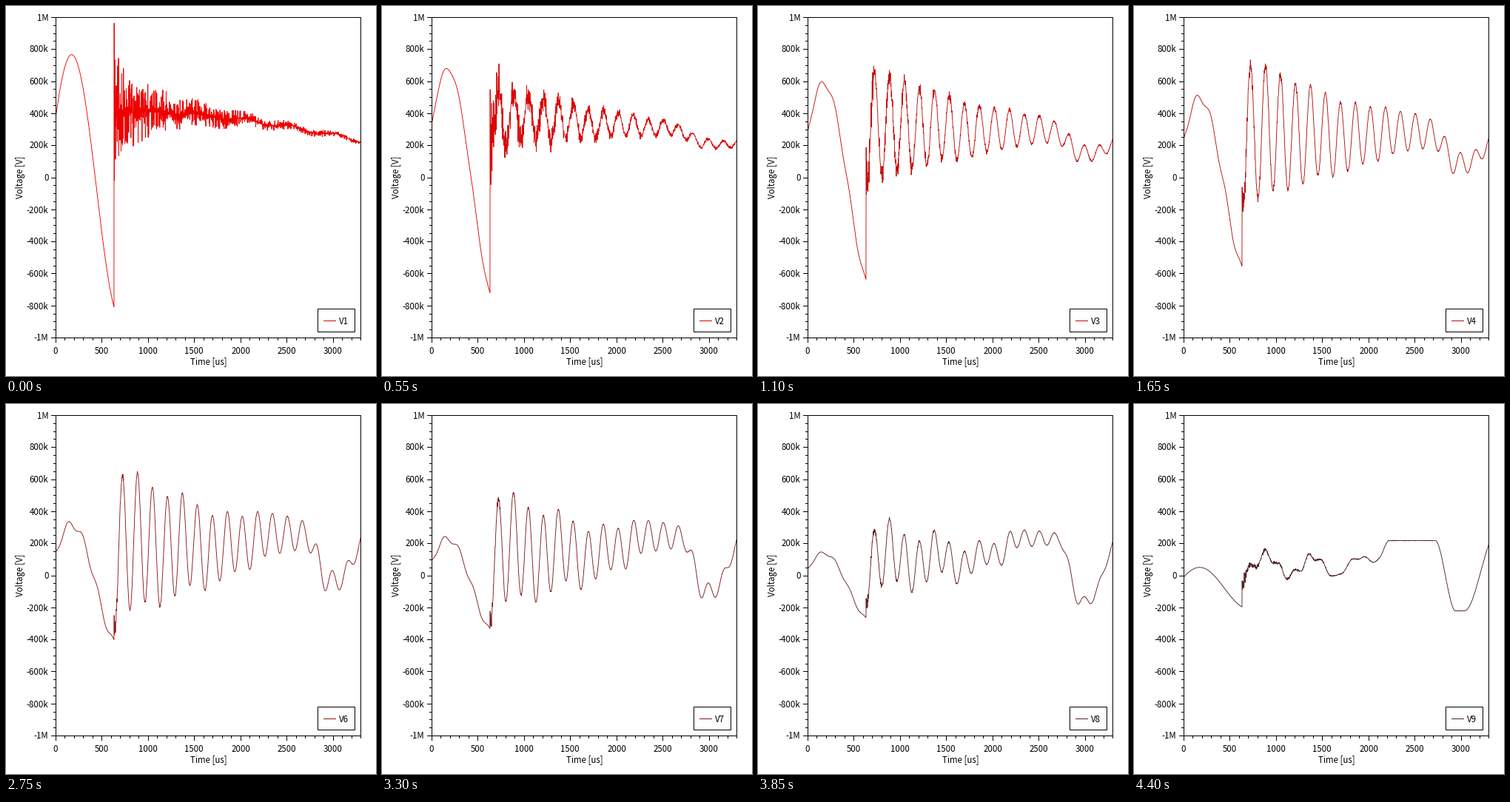
A matplotlib script that plays this animation: 500x500 px, repeating every 4.95 s.

```python
import numpy as np
import matplotlib.pyplot as plt
from matplotlib.animation import FuncAnimation
from matplotlib.patches import Rectangle

PX = 0.72  # points per pixel at 100 dpi
LEFT, RIGHT, TOP, BOTTOM = 67.5, 479.5, 15.5, 448.5
JUMP = 628      # us, when the surge starts
PERIOD = 162.2  # us, ringing of the line
plt.rcParams["font.family"] = ["Noto Sans CJK JP", "DejaVu Sans"]
plt.rcParams["path.snap"] = False

T1 = np.linspace(0, JUMP, 160)
T2 = np.arange(JUMP + 4, 3301, 3.0)
T = np.r_[T1, JUMP + 2, T2]

# Voltage at the far end after the surge: us, kV
FAR_END = [
    (628, -85), (715, 72), (785, 52), (880, 163), (960, 80), (1025, 78),
    (1115, -22), (1200, 38), (1265, 28), (1355, 136), (1420, 97), (1480, 101),
    (1590, -2), (1710, 14), (1830, 105), (1890, 103), (1955, 119), (2050, 83),
    (2115, 110), (2220, 219), (2720, 219), (2940, -220), (3040, -219),
    (3300, 196)]


def to_x(t):
    return LEFT + t * (RIGHT - LEFT) / 3300


def to_y(v):
    return (TOP + BOTTOM) / 2 - v * (BOTTOM - TOP) / 2000


def mix(a, b, u):
    return a + (b - a) * u


def smooth(t, knots):
    """Monotone cubic curve through the knots, flat at every extremum."""
    xs, ys = np.array(knots, float).T
    h = np.diff(xs)
    d = np.diff(ys) / h
    same = d[:-1] * d[1:] > 0
    total = np.where(same, d[:-1] + d[1:], 1)
    m = np.r_[d[0], np.where(same, 2 * d[:-1] * d[1:] / total, 0), d[-1]]
    i = np.clip(np.searchsorted(xs, t, side="right") - 1, 0, len(h) - 1)
    s = (t - xs[i]) / h[i]
    return (ys[i] * (1 + 2 * s) * (1 - s) ** 2 + ys[i + 1] * s * s * (3 - 2 * s)
            + h[i] * (m[i] * s * (1 - s) ** 2 - m[i + 1] * s * s * (1 - s)))


def ringing(t, crest):
    return np.cos(2 * np.pi * (t - crest) / PERIOD)


def voltage(n):
    """Trace at point n of 1..9: both ends mixed, plus a standing wave."""
    u = (n - 1) / 8
    wave = np.sin(np.pi * u)
    fall = np.exp(-0.45 * (n - 1) ** 1.3)

    pre = (mix(828, 130, u) * np.cos(0.005875 * (T1 - 170)) + mix(-60, -78, u)
           + 28 * wave * ringing(T1, 130))

    near = (420 - 190 * ((T2 - JUMP) / 2672) ** 1.8
            + 12 * np.cos(2 * np.pi * (T2 - 2050) / 490))
    ms = (T2 - 721) / 1000
    decay = np.exp(-ms * (0.5 + 0.14 * ms))
    post = (mix(near, smooth(T2, FAR_END), u)
            + 455 * wave * decay * ringing(T2, 721))
    spike = post[0] + 45 + 490 * fall

    amp = (max(fall, 0.06) * (165 * np.exp(-ms / 0.7) + 6)
           + (30 + 80 * fall) * np.exp(-(T2 - 640) / 40))
    sign = np.where(np.arange(len(T2)) % 2, 1, -1)
    hiss = 1.5 * amp * sign * np.random.default_rng(40 + n).random(len(T2)) ** 2
    return np.r_[pre, spike, post + hiss]


def shade(n):
    u = (n - 1) / 8
    return mix(238, 80, u) / 255, 36 * u / 255, 36 * u / 255


fig = plt.figure(figsize=(5, 5), dpi=100, facecolor="white")
ax = fig.add_axes([0, 0, 1, 1])
ax.set_xlim(0, 500)
ax.set_ylim(500, 0)
ax.axis("off")


def rule(xs, ys):
    ax.plot(xs, ys, color="black", lw=PX, solid_capstyle="butt", zorder=3)


def box(x0, y0, x1, y1, fill, z):
    ax.add_patch(Rectangle((x0, y0), x1 - x0, y1 - y0, facecolor=fill,
                           edgecolor="black", lw=PX, zorder=z))


def label(x, y, s, ha="center", **kw):
    return ax.text(x, y, s, ha=ha, va="baseline", fontsize=11.5 * PX,
                   color="black", zorder=6, **kw)


box(LEFT, TOP, RIGHT, BOTTOM, "none", 3)
for v in range(-1000, 1001, 50):
    y = np.floor(to_y(v)) + 0.5
    major = v % 200 == 0
    rule([LEFT - (6.5 if major else 3.5), LEFT], [y, y])
    if major:
        text = f"{v // 1000}M" if abs(v) == 1000 else f"{v}k" if v else "0"
        label(57.5, y + 4, text, ha="right")
for t in range(0, 3301, 100):
    x = np.floor(to_x(t)) + 0.5
    major = t % 500 == 0
    rule([x, x], [BOTTOM, BOTTOM + (6.5 if major else 3.5)])
    if major:
        label(x - 0.5, 470, str(t))
label(273.5, 484, "Time [us]")
label(22.5, 231, "Voltage [V]", rotation=90, rotation_mode="anchor")

box(421.5, 409.5, 471.5, 440.5, "white", 4)
key, = ax.plot([429, 446], [425.5, 425.5], lw=PX, solid_capstyle="butt", zorder=5)
name = label(450, 429.5, "", ha="left")
trace, = ax.plot([], [], lw=0.9 * PX, zorder=2)


def draw(i):
    n = i + 1
    trace.set_data(to_x(T), to_y(voltage(n)))
    trace.set_color(shade(n))
    key.set_color(shade(n))
    name.set_text(f"V{n}")
    return trace, key, name


anim = FuncAnimation(fig, draw, frames=9, interval=550, repeat=True)
plt.show()
```
